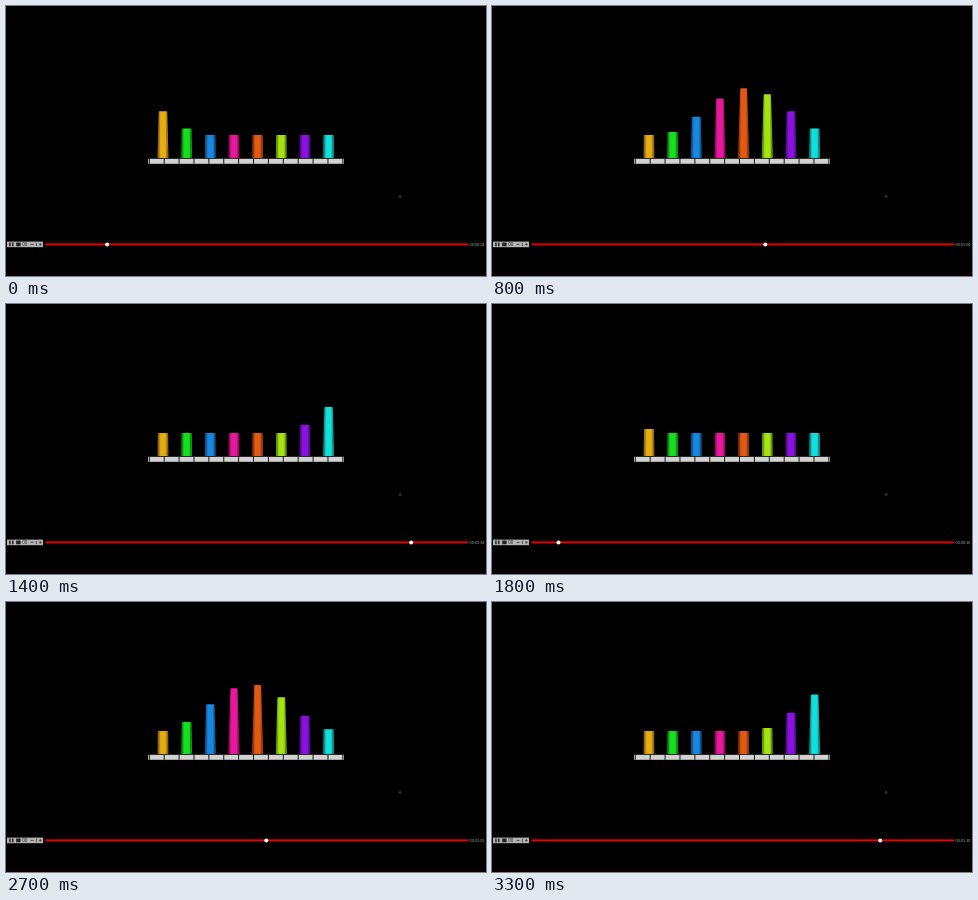
Recreate the animation shown at these times as an HTML page. Size 480 by 270 pixels, loop 3.4 s.

```html
<!DOCTYPE html>
<html lang="en">
<head>
<meta charset="utf-8">
<title>Bar wave</title>
<style>
  html, body { margin: 0; width: 100%; height: 100%; overflow: hidden; background: #000; }
  svg { display: block; width: 100vw; height: 100vh; }
  text { font-family: "Liberation Sans", Arial, sans-serif; }
</style>
</head>
<body>
<svg viewBox="0 0 480 270">
  <defs>
    <linearGradient id="shade">
      <stop offset="0" stop-opacity=".3"/>
      <stop offset=".25" stop-opacity="0"/>
      <stop offset=".75" stop-opacity="0"/>
      <stop offset="1" stop-opacity=".3"/>
    </linearGradient>
  </defs>
  <rect width="480" height="270"/>
  <rect y="266" width="480" height="4" fill="#080004"/>

  <g id="bars" stroke-width="1.6" stroke-linejoin="round"></g>

  <rect x="142" y="152.8" width="196" height="5" fill="#d0d3d0"/>
  <path id="gaps" stroke="#111" stroke-width="1"/>

  <circle cx="394.2" cy="190.5" r="1" fill="none" stroke="#666" stroke-width=".6"/>

  <rect x="1" y="235.6" width="36" height="5.6" fill="#b4b4b4"/>
  <path d="M3.2 236.5h1.5v3.8h-1.5zM6 236.5h1.5v3.8H6zM10.2 236.5h4.4v3.8h-4.4z" fill="#222"/>
  <text x="16.3" y="240.2" font-size="4.6" fill="#222">00</text>
  <path d="M24.5 238.4h3M30.4 236.8v3.3M33 238.4h2.6M34.3 237.1v2.6" stroke="#333" stroke-width=".8"/>

  <rect x="39.5" y="237.4" width="422.5" height="2" fill="#e60000"/>
  <circle id="knob" cy="238.4" r="2" fill="#fff"/>
  <text id="clock" x="463.6" y="239.8" font-size="3.8" fill="#aaa"></text>
</svg>
<script>
  const LOOP = 3400, STEP = 100, CYCLE = 98, BASE = 151.2;
  const colors = ["#e6ac14", "#17df20", "#1787e0", "#e8189c",
                  "#e35812", "#a3e312", "#8a12e0", "#12dfd9"];
  // [step, position]: playback runs at a slightly uneven rate
  const keys = [[0, 14], [4, 34.2], [8, 53.6], [14, 83.9], [22, 124.2], [27, 148.6], [33, 178]];
  const byId = id => document.getElementById(id);

  function addPath(paint) {
    const path = document.createElementNS("http://www.w3.org/2000/svg", "path");
    path.setAttribute("fill", paint);
    path.setAttribute("stroke", paint);
    byId("bars").append(path);
    return path;
  }
  const bars = colors.map(color => [addPath(color), addPath("url(#shade)")]);

  byId("gaps").setAttribute("d",
    Array.from({ length: 14 }, (_, k) => `M${143.3 + 14.89 * k} 152.8v5`).join(""));

  function position(step) {
    const i = keys.findIndex(([s]) => s >= step);
    if (i === 0) return keys[0][1];
    const [s0, p0] = keys[i - 1], [s1, p1] = keys[i];
    return (p0 + (p1 - p0) * (step - s0) / (s1 - s0)) % CYCLE;
  }

  function lift(u) {
    const s = Math.max(0, 1 - Math.abs(u - 26.25) / 24.7);
    return s * s * (3 - 2 * s);
  }

  function barPath(i, rise) {
    const x = 157 + 23.66 * i;
    const top = 129.9 - 47 * rise;
    const foot = 4.5 + 0.2 * rise, head = 4.3 - 1.7 * rise;
    return `M${x - foot} ${BASE}L${x - head} ${top}H${x + head}L${x + foot} ${BASE}Z`;
  }

  const pad = v => String(v).padStart(2, "0");

  function draw(now) {
    const p = position(Math.floor(now % LOOP / STEP));
    bars.forEach((pair, i) => {
      const d = barPath(i, lift(p - 6.6 * i));
      pair.forEach(path => path.setAttribute("d", d));
    });
    byId("knob").setAttribute("cx", 40.2 + 4.35 * p);
    const ticks = Math.round(p + 10);
    byId("clock").textContent = `00:${pad(Math.floor(ticks / 60))}:${pad(ticks % 60)}`;
  }

  const start = performance.now();
  function tick() {
    draw(performance.now() - start);
    requestAnimationFrame(tick);
  }
  tick();
</script>
</body>
</html>
```
